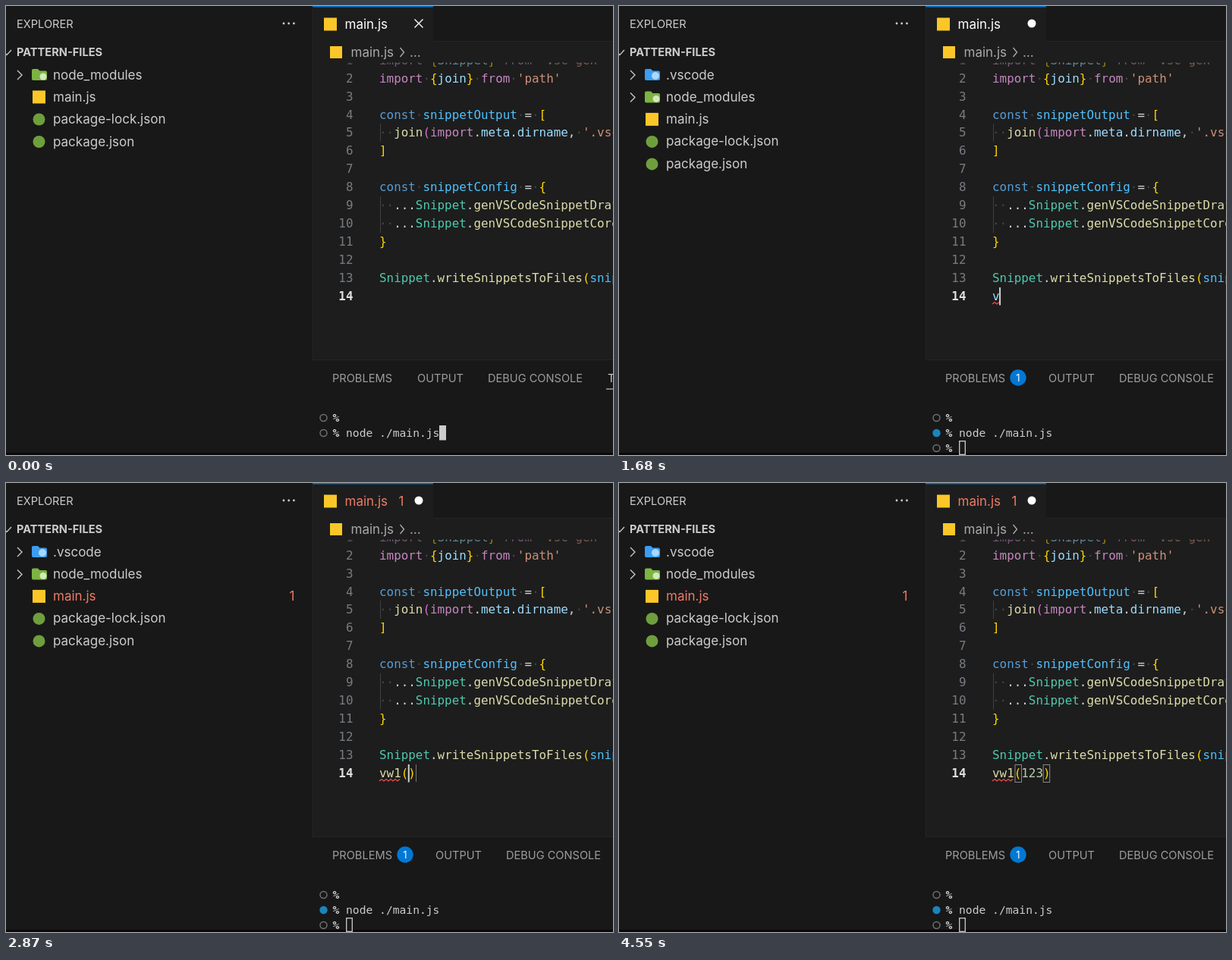
These frames come from a looping animation (800x592 px, 4.62 s). An HTML page:

```html
<!DOCTYPE html>
<html lang="en">
<head>
<meta charset="utf-8">
<title>Editor session</title>
<style>
  html, body { margin: 0; width: 100%; height: 100%; overflow: hidden; background: #181818; }
  svg { display: block; width: 800px; height: 592px; }
  text { font-family: Inter, Roboto, sans-serif; fill: #ccc; }
  .row { font-size: 17px; }
  .cap { font-size: 14.6px; }
  .bold { font-weight: 700; }
  .mid { text-anchor: middle; }
  .dim { fill: #9d9d9d; }
  .soft { fill: #a9a9a9; }
  .white { fill: #fff; }
  .err { fill: #ee7b66; }
  .mono text { font-family: "DejaVu Sans Mono", "Noto Sans Mono", monospace; }
  #code text, #list text { font-size: 15.9px; }
  #term text { font-size: 14.65px; }
  .line { fill: none; stroke: #c5c5c5; stroke-width: 1.4; }
  .box { fill: none; stroke: #888; }
  .js { fill: #fbc728; }
  .node { fill: #6f9f3c; }
  .squiggle { fill: none; stroke: #f14c4c; stroke-width: 1.3; }
  #code .num { fill: #777c82; text-anchor: end; }
  #code .now { fill: #e0e0e0; font-weight: 700; }
  .kw { fill: #c586c0; } .def { fill: #569cd6; } .const { fill: #4fc1ff; }
  .var { fill: #9cdcfe; } .fn { fill: #dcdcaa; } .type { fill: #4ec9b0; }
  .str { fill: #ce9178; } .br { fill: #ffd700; } .br2 { fill: #da70d6; }
  .op { fill: #d4d4d4; } .lit { fill: #b5cea8; } .ws { fill: #454545; }
  .hit { fill: #2aaaff; font-weight: 700; }
</style>
</head>
<body>
<svg viewBox="0 0 800 592">
  <defs>
    <clipPath id="editorClip"><rect x="404" y="74.500" width="396" height="392"/></clipPath>
    <path id="folder" d="M36 83h6l2.5 2.5H52q2 0 2 2V96q0 2-2 2H36q-2 0-2-2V85q0-2 2-2z"/>
    <path id="chev" class="line" d="M-3-6l6 6-6 6"/>
    <path id="beam" d="M-5.500-13q5.500 0 5.500 4.500V8.500q0 4.500-5.500 4.500M5.500-13q-5.500 0-5.500 4.500M5.500 13q-5.500 0-5.500-4.500M-3 4H3"/>
    <g id="snip" fill="none" stroke="#d0d0d0" stroke-width="1.5">
      <path d="M-8 7V-8H8V7"/><path d="M-8 8.5H9" stroke-dasharray="2 1.6"/>
    </g>
  </defs>

  <rect width="800" height="592" fill="#181818"/>
  <rect x="404" y="46" width="396" height="420" fill="#1d1d1d"/>
  <rect x="404" width="159" height="47" fill="#1d1d1d"/>
  <path d="M404.5 2V466M563 46.5H800M404 466.5H800" stroke="#252525"/>
  <rect x="404" width="159" height="1.500" fill="#0078d4"/>
  <rect y="589" width="800" height="3" fill="#0c080c"/>

  <!-- explorer -->
  <text class="cap" x="14" y="28.5">EXPLORER</text>
  <g fill="#ccc"><circle cx="366" cy="23" r="1.4"/><circle cx="372.7" cy="23" r="1.4"/><circle cx="379.4" cy="23" r="1.4"/></g>
  <path class="line" d="M-3 60l4 4.500 6-6.500"/>
  <text class="cap bold" x="14" y="66">PATTERN-FILES</text>
  <g data-on="700 4620">
    <use href="#chev" x="18" y="91"/>
    <use href="#folder" fill="#3c9df0"/>
    <circle cx="48" cy="92" r="5" fill="#a9d8fb"/>
    <text class="row" x="62" y="96.500">.vscode</text>
  </g>
  <g id="files">
    <use href="#chev" x="18" y="91"/>
    <use href="#folder" fill="#7cb342"/>
    <circle cx="49" cy="93" r="4.500" fill="#d3e9b8"/>
    <text class="row" x="62" y="96.500">node_modules</text>
    <rect class="js" x="35" y="111.500" width="17" height="17"/>
    <text class="row" x="62" y="126" data-on="0 1750">main.js</text>
    <g data-on="1750 4620">
      <text class="row err" x="62" y="126">main.js</text>
      <text class="row err mid" x="377" y="126">1</text>
    </g>
    <circle class="node" cx="43.500" cy="149.500" r="8"/>
    <text class="row" x="62" y="155">package-lock.json</text>
    <circle class="node" cx="43.500" cy="179" r="8"/>
    <text class="row" x="62" y="184.500">package.json</text>
  </g>

  <!-- tab and breadcrumb -->
  <rect class="js" x="419" y="15.500" width="17" height="17"/>
  <text class="row white" x="446.500" y="29.500" data-on="0 1750">main.js</text>
  <g data-on="1750 4620">
    <text class="row err" x="446.500" y="29.500">main.js</text>
    <text class="row err mid" x="521" y="29.500">1</text>
  </g>
  <path class="line" style="stroke:#fff" d="M538.500 17.500l11 11m0-11l-11 11" data-on="0 1470"/>
  <circle cx="544" cy="23" r="5.500" fill="#fff" data-on="1470 4620"/>
  <rect class="js" x="427" y="53" width="16" height="16"/>
  <text class="row soft" x="454.500" y="67">main.js</text>
  <path class="line" style="stroke:#a9a9a9" d="M519.500 55l5 6-5 6"/>
  <text class="row soft" x="532" y="67">…</text>

  <!-- editor -->
  <g id="code" class="mono" clip-path="url(#editorClip)">
    <path d="M493.500 155v24M493.500 251v48" stroke="#404040"/>
  </g>
  <path class="squiggle" id="squiggle"/>
  <path d="M540.500 371v23" stroke="#777" data-on="2800 2940"/>
  <g data-on="2940 4620">
    <rect class="box" x="522" y="371.500" width="8.500" height="23"/>
    <rect class="box" id="closeBox" y="371.500" width="8.500" height="23"/>
  </g>
  <rect id="caret" y="371" width="2" height="23.500" fill="#d0d0d0"/>

  <!-- panel -->
  <text class="cap dim" x="430" y="495.500">PROBLEMS</text>
  <g data-on="0 1680">
    <text class="cap dim" x="542" y="495.500">OUTPUT</text>
    <text class="cap dim" x="635" y="495.500">DEBUG CONSOLE</text>
    <text class="cap" x="793" y="495.500">TERMINAL</text>
    <path d="M791 505H800" stroke="#b5b5b5" stroke-width="1.300"/>
  </g>
  <g data-on="1680 4620">
    <circle cx="526" cy="490" r="10.700" fill="#0078d4"/>
    <text class="white mid" x="526" y="494.700" font-size="13">1</text>
    <text class="cap dim" x="566" y="495.500">OUTPUT</text>
    <text class="cap dim" x="659" y="495.500">DEBUG CONSOLE</text>
  </g>
  <g id="term" class="mono">
    <g fill="none" stroke="#707070" stroke-width="1.500">
      <circle cx="418.500" cy="543" r="4.500"/>
      <circle cx="418.500" cy="563" r="4.500" data-on="0 700"/>
      <circle cx="418.500" cy="583" r="4.500" data-on="700 4620"/>
    </g>
    <circle cx="418.500" cy="563" r="5.200" fill="#1a85bd" data-on="700 4620"/>
    <text class="bold" x="430.500" y="547.500">%</text>
    <text class="bold" x="430.500" y="567.500">%</text>
    <text x="448" y="567.500">node ./main.js</text>
    <text class="bold" x="430.500" y="587.500" data-on="700 4620">%</text>
    <g fill="#ccc">
      <rect x="571" y="553" width="9" height="19.500" data-on="0 140"/>
      <rect x="430.500" y="573" width="9" height="19" data-on="140 700"/>
      <rect x="448" y="573" width="9" height="19" data-on="700 1330"/>
    </g>
    <rect x="448.700" y="573.700" width="7.600" height="17.600" fill="none" stroke="#ccc" stroke-width="1.300" data-on="1330 4620"/>
  </g>

  <g id="list" class="mono"></g>

  <g id="mouse" fill="none" stroke-linecap="round" data-on="840 1470">
    <use href="#beam" stroke="#fff" stroke-width="4.600"/>
    <use href="#beam" stroke="#111" stroke-width="1.800"/>
  </g>
</svg>

<script>
const LOOP = 4620, BLINK = 420;
const CH = 9.57, LEFT = 492, PITCH = 23.92;
const NS = 'http://www.w3.org/2000/svg';
const $ = id => document.getElementById(id);

function add(parent, tag, attrs, content = '') {
  const el = document.createElementNS(NS, tag);
  for (const k in attrs) el.setAttribute(k, attrs[k]);
  el.textContent = content;
  parent.appendChild(el);
  return el;
}

const baseline = n => 100.7 + (n - 2) * PITCH;

// Tokens are "class, text" pairs; spaces show as faint dots.
function codeLine(n, tokens, attrs = {}) {
  const text = add($('code'), 'text', { x: LEFT, y: baseline(n), ...attrs });
  for (let i = 0; i < tokens.length; i += 2)
    for (const part of tokens[i + 1].match(/ +|[^ ]+/g))
      part[0] === ' '
        ? add(text, 'tspan', { class: 'ws' }, '·'.repeat(part.length))
        : add(text, 'tspan', { class: tokens[i] }, part);
}

const lines = {
  1: ['kw', 'import ', 'br', '{', 'var', 'Snippet', 'br', '} ', 'kw', 'from ', 'str', "'vsc-gen'"],
  2: ['kw', 'import ', 'br', '{', 'var', 'join', 'br', '} ', 'kw', 'from ', 'str', "'path'"],
  4: ['def', 'const ', 'const', 'snippetOutput ', 'op', '= ', 'br', '['],
  5: ['fn', '  join', 'br2', '(', 'kw', 'import', 'op', '.', 'var', 'meta', 'op', '.', 'var', 'dirname', 'op', ', ', 'str', "'.vscode'"],
  6: ['br', ']'],
  8: ['def', 'const ', 'const', 'snippetConfig ', 'op', '= ', 'br', '{'],
  9: ['op', '  ...', 'type', 'Snippet', 'op', '.', 'fn', 'genVSCodeSnippetDraft'],
  10: ['op', '  ...', 'type', 'Snippet', 'op', '.', 'fn', 'genVSCodeSnippetCore'],
  11: ['br', '}'],
  13: ['type', 'Snippet', 'op', '.', 'fn', 'writeSnippetsToFiles', 'br', '(', 'const', 'snippetOutput']
};
for (let n = 1; n <= 14; n++) {
  const faint = n === 1 ? { opacity: 0.55 } : {};
  add($('code'), 'text', { x: 457.5, y: baseline(n), class: n === 14 ? 'num now' : 'num', ...faint }, n);
  if (lines[n]) codeLine(n, lines[n], faint);
}

// Typed states of the last line: start, word, arguments (null before the call exists).
const typing = [
  [1330, '', null], [1470, 'v', null], [1820, 'vw', null], [2380, 'vw1', null],
  [2800, 'vw1', ''], [3570, 'vw1', '1'], [3710, 'vw1', '12'], [4060, 'vw1', '123']
];
typing.forEach(([start, word, args], i) => {
  if (!word) return;
  const end = i + 1 < typing.length ? typing[i + 1][0] : LOOP;
  const tokens = args === null ? ['var', word]
    : ['fn', word, 'br', '(', ...(args ? ['lit', args] : []), 'br', ')'];
  codeLine(14, tokens, { 'data-on': `${start} ${end}` });
});

function suggestions(names, hit, on, x) {
  const g = add($('list'), 'g', { 'data-on': on });
  const height = Math.min(200, names.length * PITCH + 2);
  add(g, 'rect', { x: x + 0.5, y: 394.5, width: 320, height, fill: '#1e1e1e', stroke: '#454545' });
  add(g, 'rect', { x: x + 2, y: 395.5, width: 318, height: 24, fill: '#04395e' });
  names.forEach((name, i) => {
    const y = 407 + i * PITCH;
    add(g, 'use', { href: '#snip', x: x + 14, y });
    const text = add(g, 'text', { x: x + 29.5, y: y + 5.5 });
    for (const c of name) add(text, 'tspan', hit.includes(c) ? { class: 'hit' } : {}, c);
  });
}
suggestions(['vw', 'vw0', 'vw1', 'vwc', 'vwc0', 'vwc1', 'vwe', 'vwe0', 'vwe1'], 'vw', '1890 2450', 511);
suggestions(['vw1', 'vwc1', 'vwe1'], 'vw1', '2450 2800', 511);

function wave(width) {
  let d = `M${LEFT} 393`;
  for (let x = 3; x <= width; x += 3) d += `L${LEFT + x} ${x % 2 ? 390.5 : 393}`;
  return d;
}

const timed = [...document.querySelectorAll('[data-on]')].map(el =>
  [el, ...el.dataset.on.split(' ').map(Number)]);

// The caret blinks anew after each key and once the call has settled.
const resets = [...typing.map(s => s[0]), 2940].sort((a, b) => a - b);

function render(t) {
  for (const [el, a, b] of timed) el.style.visibility = t >= a && t < b ? 'visible' : 'hidden';

  $('files').setAttribute('transform', `translate(0 ${t >= 700 ? 29.4 : 0})`);

  const [, word, args] = typing.filter(s => t >= s[0]).pop() || [0, '', null];
  const col = word.length + (args === null ? 0 : 1 + args.length);
  const since = t - (resets.filter(r => t >= r).pop() ?? t);
  const lit = t >= resets[0] && Math.floor(since / BLINK) % 2 === 0;
  $('caret').setAttribute('x', LEFT + col * CH - 0.5);
  $('caret').style.visibility = lit ? 'visible' : 'hidden';
  $('closeBox').setAttribute('x', LEFT + col * CH + 0.2);
  $('squiggle').setAttribute('d', t >= 1680 ? wave(word.length * CH + 1) : '');

  const p = Math.min(1, Math.max(0, (t - 840) / 210));
  const ease = 1 - (1 - p) ** 2;
  $('mouse').setAttribute('transform', `translate(${625 - 62 * ease} ${520 - 118 * ease})`);
}

const begin = performance.now();
function tick() {
  render((performance.now() - begin) % LOOP);
  requestAnimationFrame(tick);
}
tick();
</script>
</body>
</html>
```
